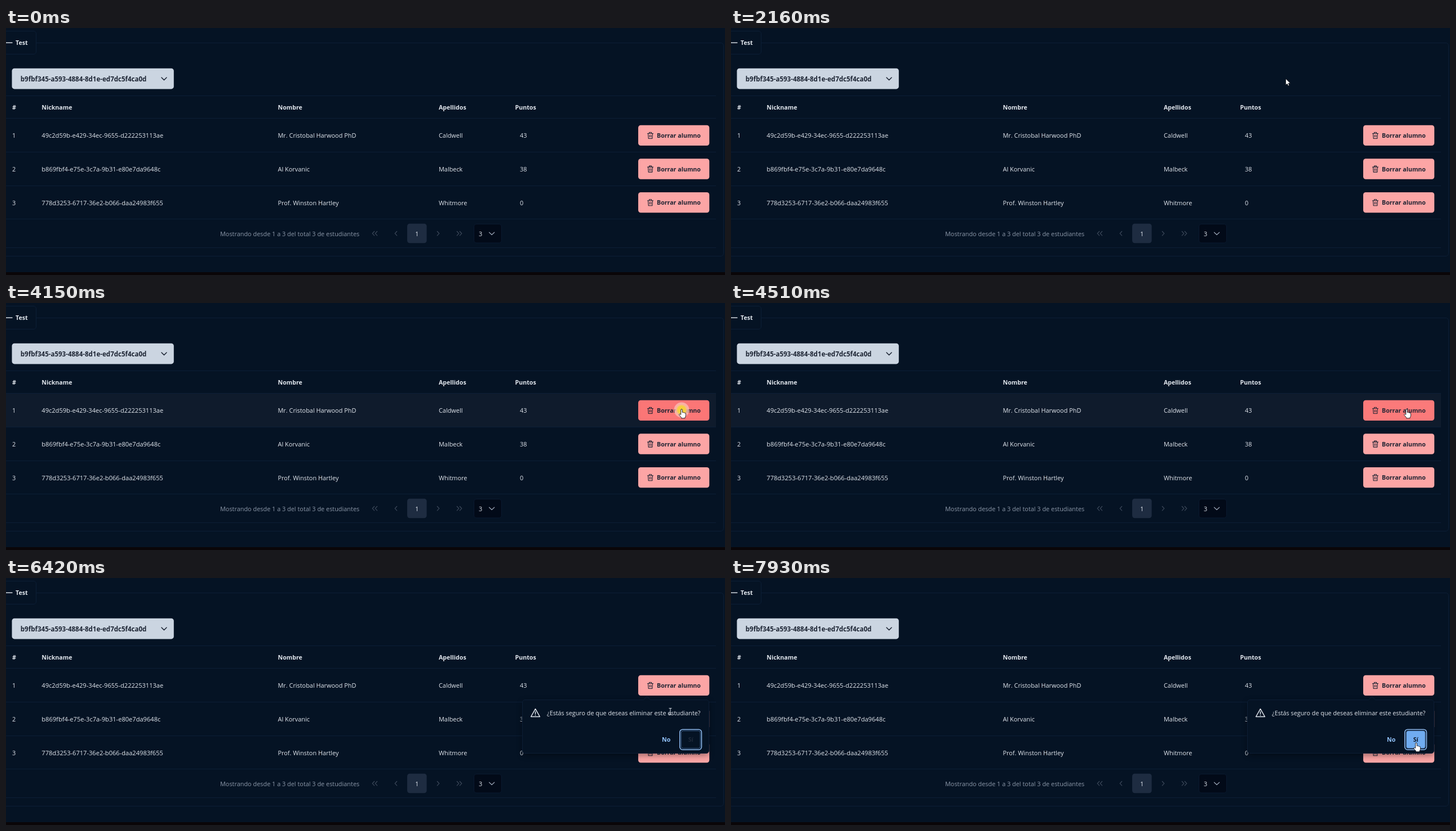
These frames come from a looping animation (1276x439 px, 8 s). An HTML page:

```html
<!DOCTYPE html>
<html lang="es">
<head>
<meta charset="utf-8">
<title>Alumnos</title>
<style>
  html, body { margin: 0; width: 100%; height: 100%; overflow: hidden; background: #051324; }
  svg { display: block; }
  text { font: 10.9px "Open Sans", "Noto Sans", sans-serif; fill: #e2e7ee; }
  .id { font-size: 11.1px; }
  .ask { font-size: 10.8px; }
  .bold { font-size: 10.65px; font-weight: 700; }
  .pick { font-size: 11.55px; font-weight: 700; fill: #1c2433; }
  .muted { fill: #8c98a9; }
  .rule { stroke: #0c1e36; fill: none; }
  .icon { fill: none; stroke-width: 1.2; stroke-linecap: round; stroke-linejoin: round; }
  .shadow { filter: blur(6px); opacity: .4; }
</style>
</head>
<body>
<svg width="1276" height="439" viewBox="0 0 1276 439">
  <defs>
    <radialGradient id="glow">
      <stop offset="0" stop-color="#f8d02c"/>
      <stop offset=".55" stop-color="#f5cf4a"/>
      <stop offset=".7" stop-color="#f9c9a8" stop-opacity=".75"/>
      <stop offset="1" stop-color="#fbd0d0" stop-opacity=".6"/>
    </radialGradient>
  </defs>

  <rect width="1276" height="439" fill="#051324"/>
  <rect y="434" width="1276" height="5" fill="#0a0608"/>
  <g id="rows"></g>

  <path class="rule" d="M54 26.5H1268Q1273.5 26.5 1273.5 32V399Q1273.5 405.5 1268 405.5H0M0 390.5H1260"/>
  <rect class="rule" x="-9.5" y="5.5" width="63" height="41" rx="4.500"/>
  <path d="M0 26.2H11.5" stroke="#e2e7ee" stroke-width="1.4"/>
  <text class="bold" x="17" y="30">Test</text>

  <rect x="10.5" y="71.8" width="287.3" height="36.6" rx="4.5" fill="#cbd5e1"/>
  <text class="pick" x="25.8" y="94.5">b9fbf345-a593-4884-8d1e-ed7dc5f4ca0d</text>
  <path class="icon" d="M276 88l4.5 4.5 4.5-4.5" stroke="#1c2433" style="stroke-width:1.5"/>

  <g id="table"></g>

  <text class="muted" x="380" y="369.5">Mostrando desde 1 a 3 del total 3 de estudiantes</text>
  <rect x="712" y="347.8" width="34.6" height="34.5" rx="4.5" fill="#1e2c41"/>
  <text x="729.3" y="369.5" text-anchor="middle">1</text>
  <g id="pager" class="icon" stroke="#3d495b"></g>
  <rect x="830.5" y="348.5" width="49" height="33.5" rx="4.5" fill="#020a18" stroke="#0b1a30"/>
  <text x="839" y="370">3</text>
  <path class="icon" d="M857.5 363.2l4.6 4.3 4.6-4.3" stroke="#98a4b5"/>

  <g id="popup">
    <rect class="shadow" x="917" y="220" width="330" height="95"/>
    <rect x="916.5" y="216.5" width="331" height="95" rx="4.5" fill="#051324" stroke="#0d1e35"/>
    <path d="M1131 217L1137.5 210.5L1144 217" fill="#051324" stroke="#0d1e35"/>
    <path class="icon" d="M939.5 232.7L947.4 246.5H931.6ZM939.5 237.5V241.5M939.5 243.8V244"
      stroke="#e2e7ee" style="stroke-width:1.5"/>
    <text class="ask" x="960" y="243.5">¿Estás seguro de que deseas eliminar este estudiante?</text>
    <text class="bold" x="1164" y="291" style="fill:#93c5fd">No</text>
    <rect x="1195.8" y="269.2" width="38.6" height="36" rx="5" fill="none" stroke="#8db9ee" stroke-width="1.6"/>
    <rect id="yes" x="1198.3" y="271.6" width="33.8" height="31.2" rx="3.5" stroke="#3c5f8d"/>
    <text id="yesText" class="bold" x="1215.3" y="291" text-anchor="middle">Sí</text>
  </g>

  <circle id="click" cx="1199" cy="190" r="13.5" fill="url(#glow)"/>
  <path id="arrow" fill="#fff" stroke="#05080e" stroke-width=".8"
    d="M0 0V11.7L2.7 9.2L4.4 13L6.4 12.1L4.7 8.4H8.3Z"/>
  <path id="hand" fill="#fff" stroke="#11151d" stroke-width=".9" stroke-linejoin="round"
    d="M-1.3 9.5V1.1Q-1.3-.3 0-.3T1.3 1.1V5.5Q2.6 4.7 3.5 5.9Q4.8 5.2 5.5 6.5Q7.4 6 7.4 8V11Q7.4 13 6 14.3V15.8H-.5V14.5L-4 10.3Q-4.8 9-3.8 8.3Q-2.9 7.8-1.3 9.5Z"/>
  <path id="beam" d="M-2.5-5.5H2.5M0-5.5V5.5M-2.5 5.5H2.5" stroke="#d5dae2" fill="none"/>
</svg>
<script>
const LOOP = 8000, ENTER = 280, PRESS = 4090, OPEN = 4600;
const $ = id => document.getElementById(id);

const students = [
  ['49c2d59b-e429-34ec-9655-d222253113ae', 'Mr. Cristobal Harwood PhD', 'Caldwell', 43],
  ['b869fbf4-e75e-3c7a-9b31-e80e7da9648c', 'Al Korvanic', 'Malbeck', 38],
  ['778d3253-6717-36e2-b066-daa24983f655', 'Prof. Winston Hartley', 'Whitmore', 0]
];
const columns = { '#': 11, Nickname: 63.3, Nombre: 482.5, Apellidos: 768, Puntos: 903.5 };
const ROW = 59.7;
const rowTop = i => 161 + ROW * i;
const each = (list, draw) => list.map(draw).join('');
const label = (x, y, s, cls = '') => `<text class="${cls}" x="${x}" y="${y}">${s}</text>`;
const rule = y => `<path class="rule" d="M0 ${Math.round(y) - .5}H1260"/>`;
const chevron = (x, dir) =>
  `<path d="M${x - 1.7 * dir} 361.5l${3.5 * dir} 3.7 ${-3.5 * dir} 3.7"/>`;

const deleteButton = i => `
  <g id="del${i}" fill="#1c2231" stroke="#1c2231" transform="translate(1122 ${172.7 + 59.6 * i})">
    <rect width="126.2" height="36.4" rx="4.5" stroke="none" fill="#fca5a5"/>
    <path class="icon" style="stroke-width:1.1" transform="translate(16 12.3)"
      d="M.5 2.5H10.5M3.5 2.5V.5H7.5V2.5M1.5 2.5L2.2 11.5H8.8L9.5 2.5M4.2 5.2V8.8M6.8 5.2V8.8"/>
    <text class="bold" style="fill:inherit" stroke="none" x="33" y="22.3">Borrar alumno</text>
  </g>`;

$('rows').innerHTML = each(students, (_, i) =>
  `<rect id="row${i}" y="${rowTop(i)}" width="1260" height="${ROW}" fill="#0f1b2c"/>`);

$('table').innerHTML =
  each([121, 161, 221, 281, 340], rule) +
  each(Object.entries(columns), ([s, x]) => label(x, 145, s, 'bold')) +
  each(students, ([id, name, surname, points], i) => {
    const y = 195 + i * 60;
    return label(11, y, i + 1) + label(columns.Nickname, y, id, 'id') + label(columns.Nombre, y, name) +
      label(columns.Apellidos, y, surname) + label(912, y, points) + deleteButton(i);
  });

$('pager').innerHTML = chevron(652, -1) + chevron(657, -1) + chevron(692, -1) +
  chevron(767, 1) + chevron(802, 1) + chevron(807, 1);

// Pointer stops: time, x, y
const stops = [
  [ENTER, 930, 440], [1000, 962, 176], [1240, 968, 147], [1900, 982, 84], [2650, 989, 101],
  [3090, 1102, 141.5], [3550, 1174, 148], [3930, 1199, 189], [5330, 1199, 189],
  [6050, 1147, 203], [6420, 1179, 237], [7120, 1200, 283], [7500, 1214, 305],
  [7750, 1213, 304], [7930, 1216, 293]
];
const clamp = v => Math.min(1, Math.max(0, v));
const ramp = (t, start, length) => clamp((t - start) / length);

function pointer(t) {
  const n = stops.findIndex(s => s[0] > t);
  const b = stops.at(n), a = n > 0 ? stops[n - 1] : b;
  const p = a === b ? 0 : (t - a[0]) / (b[0] - a[0]);
  return { t, x: a[1] + (b[1] - a[1]) * p, y: a[2] + (b[2] - a[2]) * p };
}

// Hit areas follow the pointer, so hover states need no timing of their own
const inside = (p, l, t, r, b) => p.t >= ENTER && p.x >= l && p.x <= r && p.y >= t && p.y <= b;
const onDelete = p => inside(p, 1122, 173, 1248, 209);
const onPopup = p => p.t > OPEN && inside(p, 917, 217, 1247, 311);
const onYes = p => onPopup(p) && inside(p, 1199, 271, 1233, 303);
const onText = p => onPopup(p) && inside(p, 960, 231, 1233, 250);
const onRow = i => p => !onPopup(p) && inside(p, 0, rowTop(i), 1260, rowTop(i + 1));

// Linear transition: share of the last moments spent hovering
function hover(t, test, length = 150, samples = 15) {
  let hits = 0;
  for (let i = 0; i < samples; i++) hits += test(pointer(t - i * length / samples));
  return hits / samples;
}
const mix = (a, b, p) => `color-mix(in srgb, ${b} ${(p * 100).toFixed(1)}%, ${a})`;
const fade = (id, v) => $(id).setAttribute('opacity', v);

function render(t) {
  students.forEach((_, i) => fade('row' + i, hover(t, onRow(i), 100)));

  // The button pales and its label dims while the dialog opens
  const opening = ramp(t, OPEN - 120, 270), dim = opening - ramp(t, OPEN + 150, 250);
  const del = $('del0'), ink = mix('#1c2231', '#7a4a52', dim);
  del.style.fill = del.style.stroke = ink;
  del.firstElementChild.style.fill = mix('#fca5a5', '#fb7676', hover(t, onDelete) * (1 - opening * .65));

  fade('popup', ramp(t, OPEN, 155));
  const yes = hover(t, onYes);
  $('yes').style.fill = mix('#051324', '#70acf0', yes);
  $('yesText').style.fill = mix('#1e293a', '#0f1a2b', yes);

  fade('click', ramp(t, PRESS, 50) - ramp(t, PRESS + 210, 50));
  const p = pointer(t);
  const kind = t < ENTER ? '' : onDelete(p) || onYes(p) ? 'hand' : onText(p) ? 'beam' : 'arrow';
  for (const id of ['arrow', 'hand', 'beam']) {
    $(id).setAttribute('transform', `translate(${p.x.toFixed(1)} ${p.y.toFixed(1)})`);
    fade(id, id === kind ? 1 : 0);
  }
}

const start = performance.now();
function tick() {
  render((performance.now() - start) % LOOP);
  requestAnimationFrame(tick);
}
tick();
</script>
</body>
</html>
```
